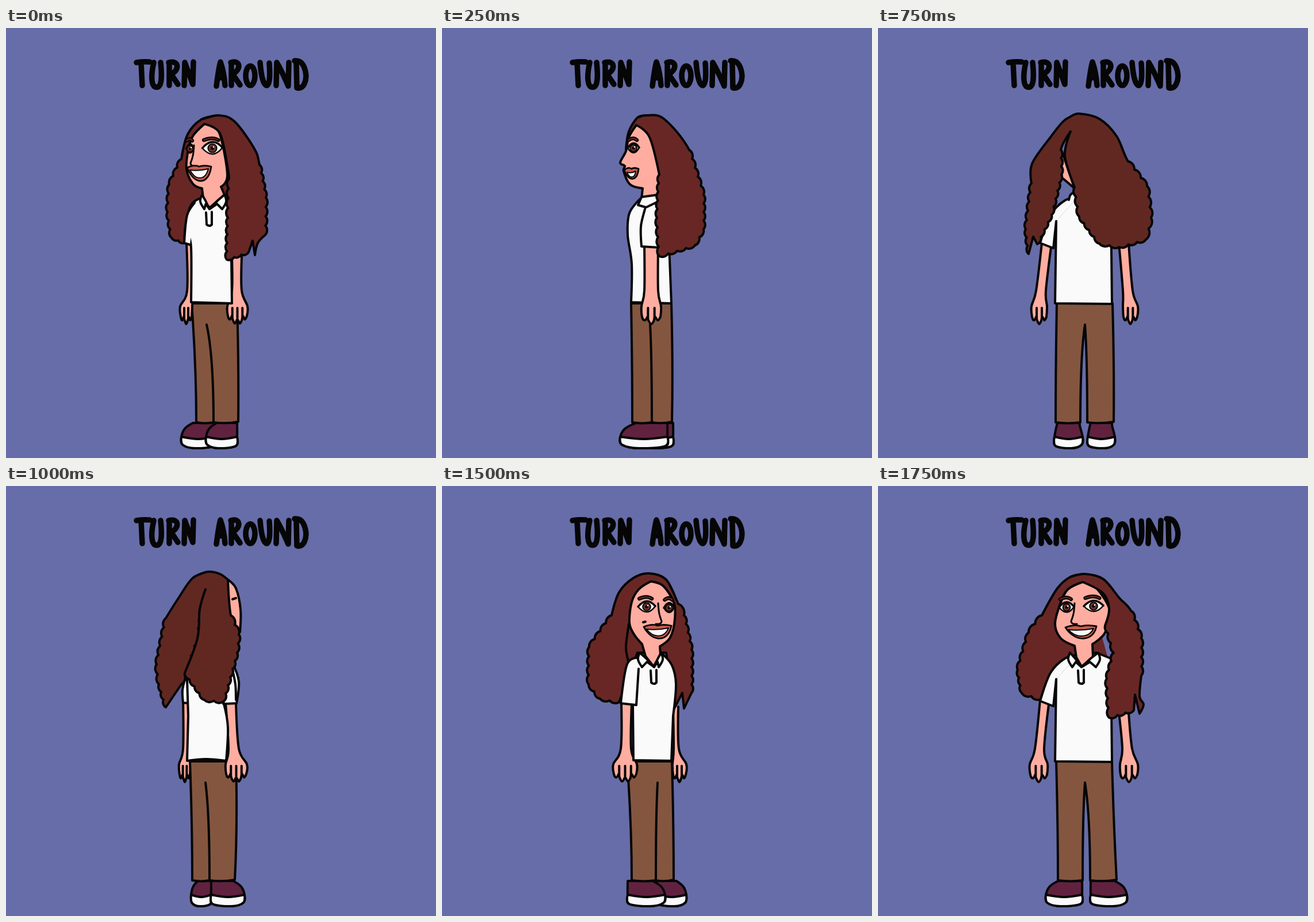
An HTML page for the animation above (2 s loop, 748x748 px).

```html
<!DOCTYPE html>
<html lang="en">
<head>
<meta charset="utf-8">
<title>Turn around</title>
<style>
html, body { margin: 0; width: 100%; height: 100%; overflow: hidden; background: #676da8; }
svg { display: block; width: 100%; height: 100%; stroke: #060606; stroke-linecap: round; stroke-linejoin: round; }
</style>
</head>
<body>
<svg viewBox="0 0 748 748">
  <g role="img" aria-label="TURN AROUND" fill="none" stroke-width="9.5">
    <path d="M227 60Q238 58 250 59M235 60L237 100"/>
    <path d="M257 60C252 82 252 103 262 103C272 103 271 80 269 60"/>
    <path d="M284 62V100M283 60C302 55 302 74 287 80L299 98"/>
    <path d="M310 100L311 60L325 98L326 59"/>
    <path d="M366 101C368 85 370 70 373 59C377 70 380 87 381 100M369 87L379 86"/>
    <path d="M392 62V100M391 60C409 55 409 73 394 80L407 99"/>
    <ellipse cx="425" cy="83" rx="8" ry="17"/>
    <path d="M442 60C444 85 448 100 454 100C460 97 459 75 458 61"/>
    <path d="M470 100L471 60C480 75 486 90 491 101L492 60"/>
    <path d="M505 62L506 104C518 108 524 90 521 76C518 62 512 56 502 57"/>
  </g>
  <g id="figure"></g>
</svg>
<script>
const SKIN = '#ffada0', WHITE = '#fafafa', BROWN = '#845640', MAROON = '#61223f', LIPS = '#c85b50';
const HAIR = '#682725', HAIR_BACK = '#612822';

const path = (d, fill = 'none', width = 4, stroke = '#060606') =>
  `<path d="${d}" fill="${fill}" stroke-width="${width}" stroke="${stroke}"/>`;

// A straight run of small outward bumps from a to b.
function curls(a, b) {
  const dx = b.x - a.x, dy = b.y - a.y, length = Math.hypot(dx, dy);
  const count = Math.max(1, Math.round(length / 16)), r = length / count * 0.75;
  let d = '';
  for (let i = 1; i <= count; i++) d += `A${r} ${r} 0 0 1 ${a.x + dx * i / count} ${a.y + dy * i / count}`;
  return d;
}

// Smooth curve through points: "!" marks a corner, "~" curls leading to the point, a final "z" closes it.
function trace(text) {
  const tokens = text.split(' '), closed = tokens[tokens.length - 1] === 'z';
  if (closed) tokens.pop();
  const points = tokens.map(token => {
    const [x, y] = token.split(',').map(parseFloat);
    return { x, y, sharp: /[!~]/.test(token), curly: token.endsWith('~') };
  });
  const n = points.length;
  const at = i => points[closed ? (i + n) % n : Math.min(n - 1, Math.max(0, i))];
  const handle = (i, sign) => {
    const p = at(i), k = p.sharp ? 0 : sign / 6;
    return `${p.x + (at(i + 1).x - at(i - 1).x) * k} ${p.y + (at(i + 1).y - at(i - 1).y) * k}`;
  };
  let d = `M${points[0].x} ${points[0].y}`;
  for (let i = 0; i < (closed ? n : n - 1); i++) {
    const b = at(i + 1);
    d += b.curly ? curls(at(i), b) : `C${handle(i, 1)} ${handle(i + 1, -1)} ${b.x} ${b.y}`;
  }
  return d + (closed ? 'Z' : '');
}

const shape = (fill, text) => path(trace(text), fill);
const skin = text => shape(SKIN, text);
const cloth = text => shape(WHITE, text);
const hair = text => shape(HAIR, text);
const backHair = text => shape(HAIR_BACK, text);
const line = text => shape('none', text);

function shoe(heel, tip, front = false) {
  const x = u => heel + (tip - heel) * u;
  const [from, to] = front ? [0.1, 0.9] : [0, 0.66];
  const bottom = `${x(0.96)},725 ${x(0.6)},731 ${x(0.04)},727`;
  return shape(MAROON, `${x(from)},687! ${x(to)},687! ${x(0.9)},${front ? 692 : 697} ${x(1)},712 ${bottom} ${x(0)},712 z`) +
    cloth(`${x(0)},711! ${x(0.5)},715 ${x(1)},711! ${bottom} z`);
}

// The seam opens into a gap where its two lower ends lie apart.
function pants(left, right, leftHem, rightHem, seam, seamLeft, seamRight = seamLeft) {
  return path(`M${left} 479H${right}Q${right + 3} 590 ${rightHem} 685Q${(rightHem + seamRight) / 2} 689 ${seamRight} 686` +
    `Q${seamRight} 570 ${seam} 516Q${seamLeft} 570 ${seamLeft} 686Q${(leftHem + seamLeft) / 2} 689 ${leftHem} 686` +
    `Q${leftHem} 590 ${left} 479Z`, BROWN);
}

function arm(x, y, width, wrist, hand, span, fingers) {
  const finger = span / fingers;
  let tips = '', gaps = '';
  for (let i = 0; i < fingers; i++) {
    const left = hand + finger * i, low = 502 + 13 * Math.sin(Math.PI * (i + 0.5) / fingers);
    tips += `${left + 1},${low - 6} ${left + finger / 2},${low} ${left + finger - 1},${low - 6}! `;
    if (i) gaps += line(`${left},487 ${left},505`);
  }
  return skin(`${x},${y}! ${wrist},457 ${hand},484 ${tips}${hand + span},484 ${wrist + width},457 ${x + width},${y}!`) + gaps;
}

function eye(x, y, width, height) {
  const w = width / 2, r = height * 0.4;
  const lid = `M${x - w} ${y}Q${x} ${y - height * 1.1} ${x + w} ${y - 1}`;
  const brow = `M${x - w * 0.85} ${y - 14}Q${x} ${y - 20} ${x + w * 0.6} ${y - 14}`;
  return path(`${lid}Q${x + 1} ${y + height * 1.1} ${x - w} ${y}`, WHITE, 2.5) +
    `<circle cx="${x}" cy="${y}" r="${r}" fill="#6d3028" stroke-width="2"/>` +
    `<circle cx="${x}" cy="${y}" r="${r * 0.4}" fill="#060606" stroke="none"/>` +
    `<circle cx="${x + 2}" cy="${y - 2}" r="1.3" fill="${WHITE}" stroke="none"/>` +
    path(lid, 'none', 3.5) + path(brow, 'none', 6.5) + path(brow, 'none', 2, HAIR);
}

const nose = (x, y, side) =>
  path(`M${x} ${y}c${side} 14 ${side} 18 ${side * 6} 31q0 6 ${-side * 10} 5`, 'none', 3);

function mouth(left, right, y, depth) {
  const mid = (left + right) / 2, w = right - left;
  return path(`M${left} ${y}Q${left + w * 0.3} ${y - 6} ${mid} ${y - 2}Q${right - w * 0.3} ${y - 5} ${right} ${y - 2}` +
      `C${right - w * 0.1} ${y + depth * 1.3} ${left + w * 0.3} ${y + depth * 1.3} ${left} ${y}Z`, LIPS, 2.8) +
    path(`M${left + 5} ${y + 4}Q${mid} ${y + 6} ${right - 5} ${y + 2}` +
      `C${right - w * 0.25} ${y + depth * 0.95} ${left + w * 0.35} ${y + depth * 0.95} ${left + 5} ${y + 4}Z`, WHITE, 2);
}

function collar(left, middle, right) {
  const flap = x => {
    const d = middle - x, s = Math.sign(d);
    return cloth(`${x},290! ${x - 3 * s},302 ${x + 4 * s},315! ${x + d * 0.5},306! ${middle},315! ${x + d * 0.45},300! z`);
  };
  return flap(left) + flap(right) + path(`M${middle - 6} 321l1 21q5 4 9 0v-22`);
}

const torso = cloth('310,336! 308,479! 407,480! 405,300! 380,290! 348,294!') +
  cloth('348,294! 325,300 300,325 282,374! 305,383! 310,336!');

const threeQuarterLeft = [
  shoe(364, 305), shoe(402, 348),
  pants(323, 402, 331, 404, 349, 361),
  arm(314, 374, 10, 315, 303, 21, 3), arm(393, 398, 17, 393, 385, 35, 4),
  hair('390,300! 330,300 313,340 311,374! 288,365~ 281,320~ 284,272~ 305,228~ 316,185 340,159 370,152'),
  cloth('340,296! 326,304 317,330 316,355 322,382 322,477! 393,479! 392,400! 390,300! z'),
  cloth('328,304 315,326 310,374! 320,377!'),
  skin('345,167! 325,188 317,212 314,245 325,271 341,279! 344,304! 355,312! 380,290! 374,276! 385,255 370,180 z'),
  collar(341, 354, 380),
  eye(320, 210, 13, 14), eye(359, 209, 35, 19), nose(327, 204, -1), mouth(315, 357, 243, 24),
  hair('340,159 370,152 398,163 432,210 441,238 452,295~ 451,360~ 438,374 433,395! 429,370! 422,390! 384,403~ 386,330~ 388,262~ 385,240 372,183 345,167!')
];

const profile = [
  shoe(402, 350), shoe(392, 310),
  pants(329, 399, 331, 400, 362, 365),
  hair('392,200! 345,210! 320,211! 325,180 340,156 355,152'),
  cloth('345,297! 326,322 323,360 330,410 329,477! 399,479! 392,300! z'),
  arm(352, 378, 24, 352, 347, 34, 3),
  cloth('353,315 346,345 347,380! 379,382! 382,330'),
  skin('338,169! 325,190 320,214 310,234 318,240 316,249 327,272 349,279! 347,298! 376,305! 385,210 360,180 z'),
  cloth('347,294! 341,308! 355,312! 380,300! 376,290! z'),
  eye(333, 209, 20, 15), mouth(317, 342, 247, 16),
  hair('340,156 355,152 386,158 430,212 455,290~ 455,350~ 440,378~ 378,397~ 374,330~ 378,255~ 361,190 338,169!')
];

const backLeft = [
  shoe(371, 312), shoe(371, 401),
  arm(407, 362, 11, 405, 402, 17, 3),
  pants(326, 403, 330, 401, 377, 376),
  arm(321, 358, 16, 319, 308, 31, 4),
  cloth('380,300! 395,330 406,365 405,420 404,478! 339,477! 336,430 338,385! 340,340! z'),
  skin('332,172! 321,192 317,232! 335,220!'),
  backHair('340,159 355,155 385,160 415,185 437,237 456,290~ 460,340~ 450,376~ 410,365~ 383,305~ 380,200!'),
  backHair('365,170! 378,220 383,285 363,377~ 350,366! 349,378 335,394! 327,362! 314,378! 311,335~ 320,285~ 317,235~ 328,200 332,170 340,159 355,155')
];

const back = [
  shoe(307, 356, true), shoe(365, 412, true),
  pants(311, 408, 309, 410, 360, 352, 364),
  arm(285, 374, 17, 275, 267, 27, 3), arm(419, 374, 17, 426, 426, 26, 3),
  torso,
  cloth('332,299! 335,290 342,287 345,298!'),
  skin('319,213! 327,235 342,279! 322,262!'),
  backHair('335,180! 318,212 319,255~ 302,325~ 277,376~ 270,363! 262,393! 257,350~ 267,270~ 268,236 300,190 325,160 350,149'),
  backHair('335,154 350,149 385,158 415,188 435,232 468,275~ 475,330~ 466,368~ 420,381~ 385,375~ 350,328~ 342,277~ 325,222 335,180!')
];

const backRight = [
  shoe(357, 322), shoe(357, 415),
  arm(308, 370, 10, 308, 301, 20, 3),
  pants(320, 400, 324, 398, 347, 354),
  arm(382, 378, 18, 387, 382, 37, 4),
  cloth('312,333 307,355 308,377! 318,378!'),
  cloth('315,335! 385,330! 379,379! 386,420 383,478! 348,475 315,478! 317,400! z'),
  cloth('394,308! 405,340 401,378! 378,379! 385,320!'),
  line('393,315 399,345 400,372'),
  skin('386,163! 400,178 408,215 407,254! 388,240!'), line('394,197 400,195'),
  backHair('347,180! 336,220 333,262~ 305,345~ 278,385! 266,345~ 262,310~ 278,230~ 300,195 325,160 353,149'),
  backHair('338,153 353,149 372,153 386,163! 391,225 405,258~ 402,290~ 378,375~ 345,372~ 311,325~ 333,265 337,215 347,180!')
];

const threeQuarterRight = [
  shoe(374, 425), shoe(323, 388),
  arm(402, 384, 9, 403, 401, 24, 3),
  pants(322, 400, 330, 403, 375, 372),
  arm(312, 378, 18, 311, 298, 41, 4),
  hair('360,152 390,163 411,205 421,225~ 434,285~ 434,360~ 421,387! 418,360! 404,387! 390,290! 340,290! 308,376! 275,370~ 255,345~ 256,280~ 295,225~ 308,185 333,160 z'),
  line('325,240 320,280 324,305'),
  cloth('341,300! 383,292! 400,312 407,345 402,400! 399,478! 333,477! 332,381! z'),
  cloth('342,299! 322,310 311,378! 338,381! 342,318!'),
  skin('363,166! 342,180 330,202 326,238 334,258 348,275! 354,296! 368,314! 380,293! 379,279! 396,265 404,240 404,205 385,174 z'),
  collar(344, 369, 381),
  eye(356, 210, 30, 17), eye(395, 212, 18, 15), nose(376, 204, 1), mouth(351, 399, 245, 21),
  line('350,237 354,236')
];

const front = [
  shoe(355, 292), shoe(370, 433),
  pants(310, 407, 313, 415, 360, 356, 369),
  arm(282, 372, 16, 273, 264, 31, 3), arm(419, 394, 17, 425, 421, 31, 3),
  hair('400,300! 330,305! 283,371! 250,360~ 243,320~ 262,255~ 285,225~ 312,178 335,158 360,153'),
  torso,
  skin('356,167! 330,180 317,205 308,240 318,265 342,278! 345,298! 354,314! 374,298! 373,275! 395,255 403,215 375,172 z'),
  collar(334, 354, 383),
  eye(328, 211, 26, 16), eye(375, 209, 34, 17), nose(342, 204, -1), mouth(326, 380, 246, 20),
  hair('335,158 360,153 392,162 420,195 440,217 458,265~ 458,330~ 455,366 462,380 455,396! 447,363! 445,390! 402,403~ 398,335~ 410,290~ 396,240~ 402,213 391,186 356,167!')
];

const draw = pose => pose.join('');
const mirror = pose => `<g transform="matrix(-1 0 0 1 728 0)">${draw(pose)}</g>`;
const turn = [
  draw(threeQuarterLeft), draw(profile), draw(backLeft), draw(back),
  draw(backRight), mirror(profile), draw(threeQuarterRight), draw(front)
];

const STEP = 250;
const figure = document.getElementById('figure');
const start = performance.now();
let shown = -1;

function update() {
  const index = Math.floor((performance.now() - start) / STEP) % turn.length;
  if (index !== shown) figure.innerHTML = turn[shown = index];
  requestAnimationFrame(update);
}
update();
</script>
</body>
</html>
```
